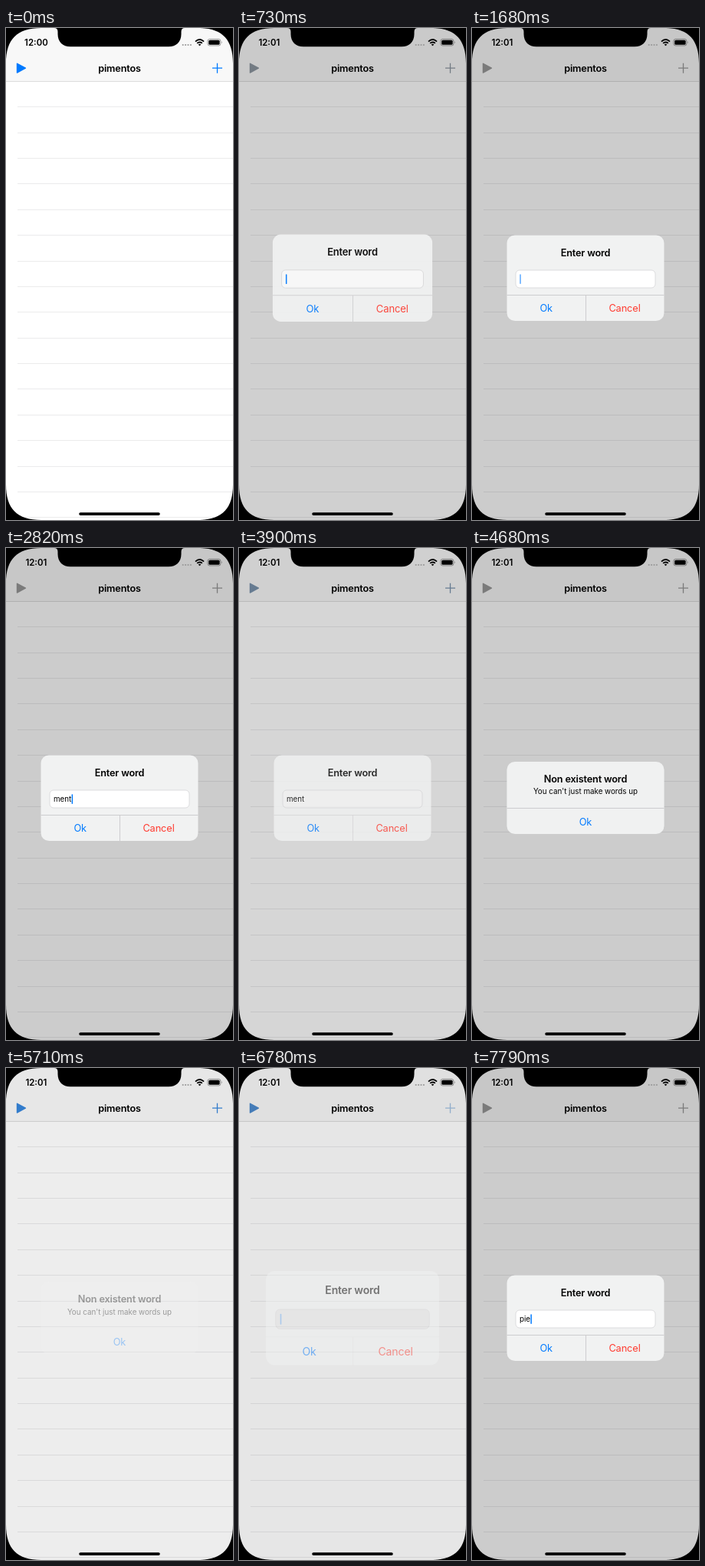
An HTML page for the animation above (8000 ms loop, 296 px wide and 640 px high).

```html
<!DOCTYPE html>
<html lang="en">
<head>
<meta charset="utf-8">
<title>Word game</title>
<style>
  html, body { margin: 0; height: 100%; overflow: hidden; background: #000; }
  svg { display: block; width: 100vw; height: 100vh; }
  text { font: 400 12.8px Inter, Roboto, sans-serif; letter-spacing: -.12px; white-space: pre; }
  .mid { text-anchor: middle; }
  .bold { font-weight: 600; font-size: 12.7px; letter-spacing: -.17px; }
  .small { font-size: 9.8px; letter-spacing: 0; }
  .blue { fill: #007aff; }
  .panel { fill: #f1f2f2; }
  .press { fill: #d9dada; }
  .rule { stroke: #cdcdcf; fill: none; }
</style>
</head>
<body>
<svg viewBox="0 0 296 640">
  <defs>
    <clipPath id="box1"><rect x="45.5" y="269.5" width="205" height="111.5" rx="10.5"/></clipPath>
    <clipPath id="box2"><rect x="45.5" y="278" width="205" height="94" rx="10.5"/></clipPath>
  </defs>

  <rect width="296" height="640" fill="#fff"/>
  <rect width="296" height="69" fill="#f8f8f8"/>
  <rect y="69" width="296" height="1" fill="#dcdcdc"/>
  <g id="rows" fill="#ebebec"></g>
  <path id="play" d="M14.5 46.3L25.4 52.2L14.5 58.1Z" stroke-width="1.4" stroke-linejoin="round"/>
  <path id="plus" d="M269 52.2H282M275.5 45.7V58.7" stroke-width="1.3" fill="none"/>
  <rect id="dim" width="296" height="640"/>

  <text class="mid bold" x="148" y="56.8">pimentos</text>
  <text class="mid bold" id="clock" x="39.4" y="23.1" style="font-size:11.4px;letter-spacing:0"></text>
  <g fill="#999">
    <circle cx="230.7" cy="22" r="1.1"/><circle cx="234.1" cy="22" r="1.1"/>
    <circle cx="237.5" cy="22" r="1.1"/><circle cx="240.9" cy="22" r="1.1"/>
  </g>
  <path d="M247 17.6Q252.5 12.4 258 17.6M249.2 19.9Q252.5 17 255.8 19.9" fill="none" stroke="#000" stroke-width="1.9"/>
  <path d="M250.7 21.4Q252.5 19.9 254.3 21.4L252.5 23.3Z"/>
  <rect x="262.9" y="14.4" width="17" height="8.6" rx="2.6" fill="none" stroke="#000" stroke-opacity=".4" stroke-width=".9"/>
  <rect x="264.2" y="15.7" width="14.4" height="6" rx="1.5"/>
  <path d="M281 17.3Q282.3 18.7 281 20.1Z" fill-opacity=".5"/>

  <g id="ask">
    <g clip-path="url(#box1)">
      <rect class="panel" x="45" y="269" width="206" height="113"/>
      <rect class="press" id="askPress" x="45" y="347.5" width="103" height="34"/>
      <path class="rule" id="askRule" d="M45 347.5H251M148.5 347.5V382"/>
    </g>
    <text class="mid bold" x="148" y="296.8">Enter word</text>
    <rect id="field" x="57" y="315" width="182" height="23" rx="5" stroke="#d5d5d7" stroke-width=".8"/>
    <text class="small" id="word" x="62" y="330.3"></text>
    <rect class="blue" id="caret" y="320.3" width="1.5" height="12.7" rx=".7"/>
    <text class="mid blue" x="96.7" y="369.4">Ok</text>
    <text class="mid" x="199" y="369.4" fill="#ff3b30">Cancel</text>
  </g>

  <g id="warn">
    <g clip-path="url(#box2)">
      <rect class="panel" x="45" y="278" width="206" height="95"/>
      <rect class="press" id="warnPress" x="45" y="338.5" width="206" height="34"/>
      <path class="rule" id="warnRule" d="M45 338.5H251"/>
    </g>
    <text class="mid bold" x="148" y="305">Non existent word</text>
    <text class="mid small" x="148" y="320.5">You can't just make words up</text>
    <text class="mid blue" x="148" y="360.7">Ok</text>
  </g>

  <!-- phone outline, notch and home bar -->
  <path fill-rule="evenodd" d="M0 0H296V640H0ZM0 46V594C0 625.5 14.5 640 46 640H250C281.5 640 296 625.5 296 594V46C296 14.5 281.5 0 250 0H46C14.5 0 0 14.5 0 46Z"/>
  <path d="M63 0Q67.5 0 67.5 5V8C67.5 18 74 24.3 84 24.3H212C222 24.3 228.5 18 228.5 8V5Q228.5 0 233 0Z"/>
  <rect x="95.2" y="630.2" width="105.6" height="3.8" rx="1.9"/>
</svg>
<script>
const LOOP = 8000, TICK = 110;
const $ = id => document.getElementById(id);
const set = (id, attrs) => {
  for (const k in attrs) $(id).setAttribute(k, attrs[k]);
};
const within = (t, a, b) => t >= a && t < b;

$('rows').innerHTML = Array.from({ length: 17 }, (_, i) =>
  `<rect x="15" y="${Math.round(69 + 33.37 * (i + 1))}" width="281" height="1"/>`).join('');

// Critically damped spring from 0 to 1, advanced in ticks; lag is its age at the first tick.
function spring(t, first, lag) {
  if (t < first) return 0;
  const x = 0.02285 * (lag + TICK * Math.floor((t - first) / TICK));
  return 1 - (1 + x) * Math.exp(-x);
}

// Last value whose start time has passed.
const latest = (t, steps) => steps.reduce((v, [at, next]) => t >= at ? next : v, steps[0][1]);

const typed = [[0, ''], [2040, 'm'], [2370, 'me'], [2610, 'men'], [2820, 'ment'],
  [5000, ''], [7540, 'pi'], [7790, 'pie']];
const blink = [[0, 1], [1200, .5], [1320, 0], [1560, .4], [1680, .65], [2040, 1],
  [3320, .5], [3440, 0], [3680, .5], [3790, 1], [3900, 0], [5000, .5], [6890, 1]];
const plusFade = [[0, 1], [500, .25], [610, .5], [720, 1], [6500, .25], [6780, .5], [6890, 1]];

function showAlert(id, grow, alpha) {
  const s = 1.2 - 0.2 * grow;
  set(id, {
    opacity: alpha,
    visibility: alpha > 0 ? 'visible' : 'hidden',
    transform: `translate(148 325.3) scale(${s}) translate(-148 -325.3)`
  });
  set(id + 'Rule', { opacity: alpha * alpha });
}

function draw(t) {
  const again = t >= 5000;
  const askIn = again ? spring(t, 6780, 73) : spring(t, 610, 73);
  const ask = askIn * (again ? 1 : 1 - spring(t, 3900, 36));
  const warnIn = spring(t, 4350, 18);
  const warn = warnIn * (1 - spring(t, 5710, 97));
  const level = Math.max(ask, warn);

  showAlert('ask', askIn, ask);
  showAlert('warn', warnIn, warn);
  set('askPress', { opacity: +within(t, 3680, 3900) });
  set('warnPress', { opacity: +within(t, 5440, 5600) });
  set('dim', { opacity: 0.2 * level });

  const tint = `rgb(${[0, 122, 255].map(c => Math.round(c + (153 - c) * level))})`;
  set('play', { fill: tint, stroke: tint });
  set('plus', { stroke: tint, opacity: latest(t, plusFade) });

  const shade = Math.round(255 - 52 * (1 - ask));
  set('field', { fill: `rgb(${shade},${shade},${shade})` });
  const word = $('word');
  word.textContent = latest(t, typed);
  set('caret', { x: 62.3 + word.getComputedTextLength(), opacity: latest(t, blink) });
  $('clock').textContent = t < 500 ? '12:00' : '12:01';
}

const begin = performance.now();
function frame() {
  draw((performance.now() - begin) % LOOP);
  requestAnimationFrame(frame);
}
frame();
</script>
</body>
</html>
```
